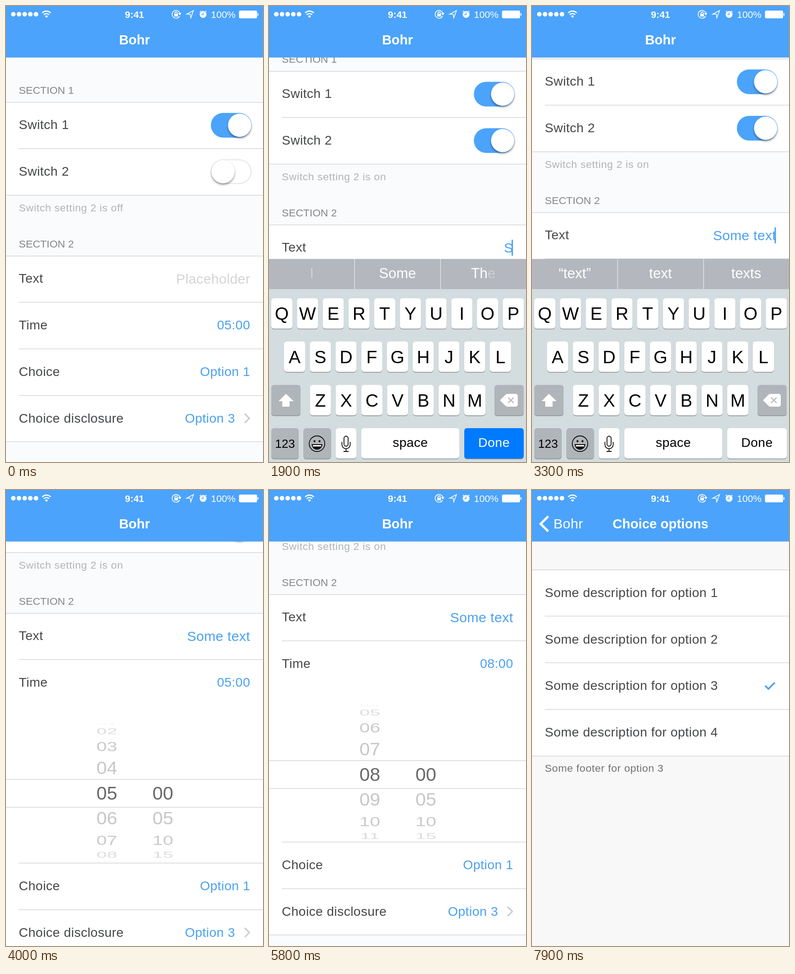
An HTML page with a canvas for the animation above (8 s loop, 562x997 px).

```html
<!DOCTYPE html>
<html lang="en">
<head>
<meta charset="utf-8">
<title>Settings demo</title>
<style>
  html, body { margin: 0; width: 562px; height: 997px; overflow: hidden; background: #f9fbfc; }
  canvas { display: block; }
</style>
</head>
<body>
<canvas id="stage" width="562" height="997"></canvas>
<script>
const ctx = document.getElementById('stage').getContext('2d');
const W = 562, H = 997, LOOP = 8000, NAV = 112.5, ROW = 101.8;
const BLUE = '#4aa0f2', BAR = '#4ba3fb', INK = '#444648', LINE = '#cfd1d3', PRESSED = '#d0f0fb';
const FAMILY = '"Liberation Sans", Arial, sans-serif';

const clamp = v => Math.max(0, Math.min(1, v));
const ramp = (t, from, to) => clamp((t - from) / (to - from));
const easeInOut = p => p < .5 ? 4 * p ** 3 : 1 - 4 * (1 - p) ** 3;
const easeOut = p => 1 - (1 - p) ** 3;
const ease = (t, from, to) => easeInOut(ramp(t, from, to));

function scoped(draw) { ctx.save(); draw(); ctx.restore(); }

function rect(x, y, w, h, color) { ctx.fillStyle = color; ctx.fillRect(x, y, w, h); }

function pill(x, y, w, h, r, color) {
  ctx.fillStyle = color;
  ctx.beginPath();
  ctx.roundRect(x, y, w, h, r);
  ctx.fill();
}

function disc(x, y, r, color) {
  ctx.fillStyle = color;
  ctx.beginPath();
  ctx.arc(x, y, r, 0, Math.PI * 2);
  ctx.fill();
}

function stroke(d, color, width) {
  ctx.strokeStyle = color;
  ctx.lineWidth = width;
  ctx.stroke(new Path2D(d));
}

function fill(d, color) { ctx.fillStyle = color; ctx.fill(new Path2D(d)); }

// y is the middle of the capital letters
function text(str, x, y, size, color, { align = 'left', weight = 400, spacing = 0 } = {}) {
  ctx.font = `${weight} ${size}px ${FAMILY}`;
  ctx.letterSpacing = spacing + 'px';
  ctx.textAlign = align;
  ctx.fillStyle = color;
  ctx.fillText(str, x, y + size * .344);
}

const label = (str, x, y, color = INK, align = 'left') => text(str, x, y - .4, 28.1, color, { align, spacing: .45 });
const footnote = (str, y, color) => text(str, 28, y, 22.8, color, { spacing: .64 });
const hairline = (y, x = 0) => rect(x, Math.round(y) - 1, W - x, 1.3, LINE);
const chevron = y => stroke(`M522 ${y - 10}l10 10l-10 10`, '#c9cacd', 3);

function group(top, rows) {
  rect(0, top, W, rows * ROW, '#fff');
  for (let i = 0; i <= rows; i++) hairline(top + i * ROW, i % rows ? 28 : 0);
}

function toggle(y, on) {
  scoped(() => {
    ctx.globalAlpha = 1 - on;
    pill(448, y - 27, 89, 54, 27, '#e4e5e6');
    pill(450, y - 25, 85, 50, 25, '#fff');
    ctx.globalAlpha = on;
    pill(448, y - 27, 89, 54, 27, BAR);
  });
  scoped(() => {
    ctx.shadowColor = 'rgba(0,0,0,.4)';
    ctx.shadowBlur = 4;
    ctx.shadowOffsetY = 3;
    disc(474.5 + 36.5 * on, y, 25.5, '#fff');
  });
}

// One column of the wheel: numbers lie on a cylinder seen from the front
function wheelColumn(x, y, position, step, count, color) {
  for (let i = 0; i < count; i++) {
    const angle = (i - position) * .375;
    if (Math.abs(angle) > 1.55) continue;
    scoped(() => {
      const depth = Math.cos(angle);
      ctx.globalAlpha = clamp(.15 + depth * 1.1);
      ctx.translate(x, y + 150 * Math.sin(angle));
      ctx.scale(1, depth);
      text(String(i * step).padStart(2, '0'), 0, 0, 41, color, { align: 'center' });
    });
  }
}

function picker(y, hour) {
  const bands = [[-155, 125, '#c6c7c8'], [-30, 60, '#68696b'], [30, 125, '#c6c7c8']];
  for (const [offset, height, color] of bands) scoped(() => {
    ctx.beginPath();
    ctx.rect(0, y + offset, W, height);
    ctx.clip();
    wheelColumn(220.5, y, hour, 1, 24, color);
    wheelColumn(343, y, 0, 5, 12, color);
  });
  hairline(y - 30);
  hairline(y + 31);
}

const keystrokes = [
  [1830, 'S'], [2050, 'o'], [2220, 'm'], [2390, 'e'], [2530, ' '],
  [2640, 't'], [2780, 'e'], [2950, 'x'], [3120, 't']
];
const typedAt = t => keystrokes.filter(k => k[0] <= t).map(k => k[1]).join('');

function scrollAt(t) {
  return Math.round(68.4 * ease(t, 800, 1250) + 26.2 * ease(t, 1980, 2300)
    + 226.4 * ease(t, 3690, 4180) - 177 * ease(t, 5740, 6140));
}

function settings(t) {
  rect(0, 0, W, H, '#f9fbfc');
  const on = ease(t, 340, 500);
  const open = Math.round(342.5 * (ease(t, 3620, 3980) - ease(t, 5740, 6140)));
  const hour = 5 + 3 * ease(t, 4350, 5400);
  const header = (str, y) => text(str, 28, y, 22.8, '#84878a');

  scoped(() => {
    ctx.translate(0, -scrollAt(t));

    header('SECTION 1', 184.5);
    group(210.5, 2);
    label('Switch 1', 28, 260);
    toggle(260.7, 1);
    label('Switch 2', 28, 362);
    toggle(362.2, on);
    footnote(`Switch setting 2 is ${on > .5 ? 'on' : 'off'}`, 441, '#b1b4b6');

    header('SECTION 2', 520.5);
    rect(0, 546.5, W, 4 * ROW + open, '#fff');
    hairline(546.5);
    hairline(648, 28);
    label('Text', 28, 596);
    const typed = typedAt(t);
    text(typed || 'Placeholder', 534, 597, 29.85, typed ? BLUE : '#d2d4d6', { align: 'right', spacing: .4 });
    const blinkOn = t > 1800 || (t - 850) % 1000 < 550;
    if (t > 850 && t < 3320 && blinkOn) rect(530.5, 579, 3, 35, BLUE);

    label('Time', 28, 698);
    label(t < 5450 ? '05:00' : '08:00', 534, 698, BLUE, 'right');
    if (open > 0) scoped(() => {
      ctx.beginPath();
      ctx.rect(0, 730, W, open + 19);
      ctx.clip();
      picker(940, hour);
    });

    ctx.translate(0, open);
    const press = (top, alpha) => scoped(() => {
      ctx.globalAlpha = alpha;
      rect(0, top, W, ROW, PRESSED);
    });
    if (t >= 6480) press(749, 1 - ramp(t, 6720, 7050));
    if (t >= 7180) press(851, 1);
    hairline(750, 28);
    hairline(852, 28);
    hairline(953);
    label('Choice', 28, 800);
    label(t < 6580 ? 'Option 1' : 'Option 2', 534, 800, BLUE, 'right');
    label('Choice disclosure', 28, 902);
    label('Option 3', 501, 902, BLUE, 'right');
    chevron(901.5);

    header('SECTION 3', 1012);
    group(1037.5, 1);
    label('Button', 281, 1087.5, INK, 'center');
  });
}

function options() {
  rect(0, 0, W, H, '#f8f8f8');
  group(174.5, 4);
  for (let i = 0; i < 4; i++) label(`Some description for option ${i + 1}`, 28, 224.5 + i * ROW);
  stroke('M510 428l7 7l14-14', BLUE, 3.5);
  footnote('Some footer for option 3', 608.5, '#6f7174');
}

function statusBar() {
  for (let i = 0; i < 5; i++) disc(16 + i * 12.4, 18, 5, '#fff');
  stroke('M79 15q9.500-8 19 0M82.500 19q6-5 12 0', '#fff', 2.6);
  fill('M85 22q3.500-3 7 0l-3.500 4z', '#fff');
  text('9:41', 281, 18.5, 21, '#fff', { align: 'center', weight: 700 });

  stroke('M379.500 22a8.500 8.500 0 1 1 .8-5M377 16l3.500 3l2-4M369.500 17v-1.500a2.500 2.500 0 0 1 5 0v1.500', '#fff', 1.7);
  rect(368, 17, 8, 6, '#fff');
  stroke('M395 18l15-8l-6 16l-1-8z', '#fff', 1.6);
  disc(431, 18.5, 7.5, '#fff');
  stroke('M423.500 13l3-2.500M435.500 10.500l3 2.500', '#fff', 1.6);
  stroke('M431 14v5h-4', BAR, 1.5);
  text('100%', 502, 18.5, 21, '#fff', { align: 'right' });
  pill(509.5, 10, 39.5, 17, 3, '#fff');
  pill(550, 15.5, 2, 6, 1, '#fff');
}

function navBar(push) {
  rect(0, 0, W, NAV, BAR);
  rect(0, NAV - 1, W, 1, '#62a5e6');
  statusBar();
  const title = (str, x, alpha) => scoped(() => {
    ctx.globalAlpha = alpha;
    text(str, x, 74, 29, '#fff', { align: 'center', weight: 700 });
  });
  title('Bohr', 281 - 201 * push, clamp(1 - push * 1.5));
  if (push > 0) {
    title('Choice options', 281 + 230 * (1 - push), push);
    scoped(() => {
      ctx.globalAlpha = push;
      stroke('M35.500 57.500l-16.500 16.500l16.500 16.500', '#fff', 5);
      text('Bohr', 47 + 200 * (1 - push), 74, 29.85, '#fff', { spacing: .45 });
    });
  }
}

function suggestions(t) {
  const SIZE = 31;
  const center = slot => 93.5 + slot * 187.5;
  const put = (str, slot) => text(str, center(slot), 584, SIZE, '#fff', { align: 'center' });
  // The word dissolves from its last letter
  const vanish = (str, slot, erased) => {
    ctx.font = `400 ${SIZE}px ${FAMILY}`;
    ctx.letterSpacing = '0px';
    let x = center(slot) - ctx.measureText(str).width / 2;
    [...str].forEach((ch, i) => {
      text(ch, x, 584, SIZE, `rgba(255,255,255,${clamp(str.length - i - erased)})`);
      x += ctx.measureText(ch).width;
    });
  };
  rect(0, 553, W, 66, '#b4b8be');
  rect(186.5, 553, 1.3, 66, '#e6e8ea');
  rect(374.5, 553, 1.3, 66, '#e6e8ea');

  if (t < 2050) {
    const erased = Math.max(0, (t - 1850) / 77);
    vanish('I', 0, erased);
    put(t < 1850 ? 'I’m' : 'Some', 1);
    vanish('The', 2, erased);
  } else {
    const words = t < 2300 ? ['“So”', 'Some', 'So'] : t < 2800 ? ['“Some”', 'Some', 'Someone'] : ['“text”', 'text', 'texts'];
    words.forEach(put);
  }
}

function key(x, y, w, color = '#fff') {
  pill(x, y + 2, w, 66, 6, '#8b9095');
  pill(x, y, w, 66.5, 6, color);
}

function keyPopup(letter, x, y) {
  const c = x + 23;
  scoped(() => {
    ctx.shadowColor = 'rgba(0,0,0,.3)';
    ctx.shadowBlur = 7;
    ctx.shadowOffsetY = 4;
    fill(`M${c - 34} ${y - 111}h68q12 0 12 12v67c0 25-23 22-23 45v48q0 6-6 6h-34q-6 0-6-6v-48c0-23-23-20-23-45v-67q0-12 12-12z`, '#fff');
  });
  text(letter, c, y - 61.5, 73, '#000', { align: 'center' });
}

function keyboard(t) {
  rect(0, 619, W, 378, '#d3dcdf');
  suggestions(t);
  const GREY = '#b0b5ba', THIRD = 828.5, BOTTOM = 923;
  const next = keystrokes.find(([at]) => t < at && t >= at - 100);
  const pressed = next && next[1].toUpperCase();
  let popup;
  [['QWERTYUIOP', 5, 639], ['ASDFGHJKL', 33, 733.5], ['ZXCVBNM', 89.5, THIRD]].forEach(([letters, left, y]) => {
    [...letters].forEach((letter, i) => {
      const x = left + i * 56.25;
      key(x, y, 46);
      text(letter, x + 23, y + 34, 39, '#000', { align: 'center' });
      if (letter === pressed) popup = [letter, x, y];
    });
  });

  key(5, THIRD, 64, GREY);
  fill('M37 848l17 16h-9v12h-16v-12h-8z', '#fff');
  key(493, THIRD, 64, GREY);
  fill('M505 862l12-12q2-2 5-2h17q5 0 5 5v18q0 5-5 5h-17q-3 0-5-2z', '#fff');
  stroke('M523 856l12 12m0-12l-12 12', GREY, 2.2);

  key(5, BOTTOM, 60, GREY);
  text('123', 35, 957.5, 26, '#000', { align: 'center' });
  key(75.5, BOTTOM, 60, GREY);
  stroke('M122 957a17 17 0 1 1-34 0a17 17 0 1 1 34 0z', '#111', 1.8);
  disc(99.5, 951.5, 2.2, '#111');
  disc(110.5, 951.5, 2.2, '#111');
  fill('M93 958h24q-2 12-12 12t-12-12z', '#111');
  rect(96, 960, 18, 3, '#fff');
  key(146, BOTTOM, 45);
  stroke('M164 945a4.500 4.500 0 0 1 9 0v13a4.500 4.500 0 0 1-9 0zM159.500 953v6a9 9 0 0 0 18 0v-6M168.500 968v6M163 974h11', '#111', 1.8);
  key(202, BOTTOM, 214, pressed === ' ' ? GREY : '#fff');
  label('space', 309, 955, '#000', 'center');
  const donePressed = t > 3240 && t < 3350;
  key(427, BOTTOM, 130, donePressed ? '#fff' : '#007aff');
  label('Done', 492, 955, donePressed ? '#000' : '#fff', 'center');
  if (popup) keyPopup(...popup);
}

function render(t) {
  const push = easeOut(ramp(t, 7320, 7850));
  scoped(() => {
    ctx.translate(-W * .3 * push, 0);
    settings(t);
  });
  if (push > 0) {
    rect(0, 0, W, H, `rgba(0,0,0,${.1 * push})`);
    scoped(() => {
      ctx.translate(W * (1 - push), 0);
      options();
    });
  }
  navBar(push);

  const raised = easeOut(ramp(t, 800, 1200)) - ease(t, 3330, 3620);
  if (raised > 0) scoped(() => {
    ctx.translate(0, 444 * (1 - raised));
    keyboard(t);
  });
}

function tick() {
  render(performance.now() % LOOP);
  requestAnimationFrame(tick);
}
tick();
</script>
</body>
</html>
```
